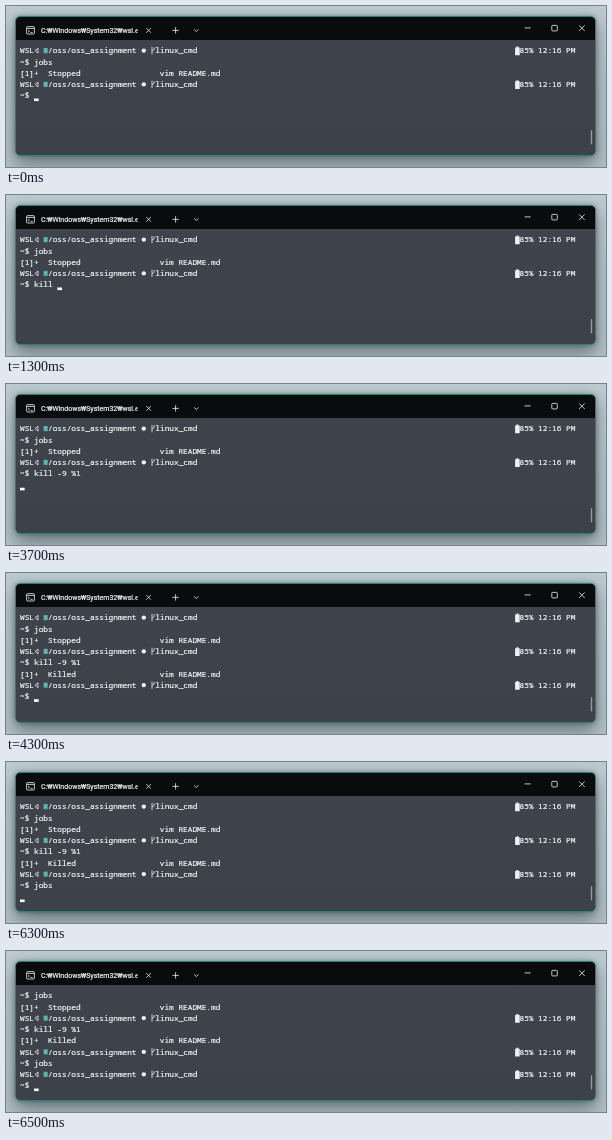
Write an HTML page that moves like this. It is 600x161 px and loops after 7300 ms.

```html
<!DOCTYPE html>
<html lang="en">
<head>
<meta charset="utf-8">
<title>Terminal: kill a stopped job</title>
<style>
  html, body { margin: 0; width: 100%; height: 100%; overflow: hidden; }
  body { position: relative; background: linear-gradient(#bccbd0, #b3c2c7); }
  .window {
    position: absolute; left: 9px; top: 10px; width: 581px; height: 140px;
    box-sizing: border-box; border: 1px solid #2b8079; border-radius: 5px; overflow: hidden;
    background: linear-gradient(#0a0b0d 23.5px, #3e434c 23.5px, #3c414a);
    box-shadow: 0 8px 18px rgba(12, 24, 28, .45), 0 0 4px rgba(12, 24, 28, .35);
  }
  svg { position: absolute; left: 0; top: 0; }
  text { white-space: pre; fill: #f2f4f5; stroke: #f2f4f5; stroke-width: .22; }
  .mono { font: 500 7.78px "Noto Sans Mono", "DejaVu Sans Mono", monospace; }
  .title { font: 7px Roboto, "Open Sans", sans-serif; }
  .line { fill: none; stroke: #eef0f2; stroke-width: .8; }
</style>
</head>
<body>
<div class="window"></div>
<svg width="600" height="161" viewBox="0 0 600 161">
  <defs>
    <clipPath id="view"><rect x="10" y="38" width="579" height="111"/></clipPath>
    <clipPath id="label"><rect x="34" y="16" width="97.5" height="18"/></clipPath>
    <g id="prompt">
      <path class="line" d="M32 3.4 29 5.8 32 8.2Z"/>
      <rect x="37.5" y="3.1" width="4.3" height="5.2" rx=".5" fill="#45aaa8"/>
      <path d="M38.5 4.8h2.2M38.5 6.5h2.2" stroke="#a5dcda" stroke-width=".6"/>
      <circle cx="137.8" cy="5.7" r="2.2" fill="#eef0f2"/>
      <path class="line" d="M146 2v7.4M146 6.2 148.2 4.6V2.6"/>
      <path fill="#eef0f2" d="M510.4 1.6h2v.9h1.3v7.8h-4.6V2.5h1.3z"/>
    </g>
  </defs>
  <g class="line">
    <rect x="20.6" y="20.6" width="7.8" height="7.4" rx="1"/>
    <path d="M20.6 22.4h7.8M22.2 24.1l1.3 1-1.3 1M24.5 26.4h2.2"/>
    <path d="M140.3 22.1l4.6 4.6m0-4.6-4.6 4.6M166.4 24.4h6.4m-3.2-3.2v6.4M188.1 23.4l2.2 2.1 2.2-2.1"/>
    <path d="M518.6 21.9h6M573.1 19.4l5.6 5.6m0-5.6-5.6 5.6"/>
    <rect x="545.8" y="19.4" width="5.5" height="5.5" rx=".7"/>
  </g>
  <text class="title" x="35" y="26.9" clip-path="url(#label)">C:₩Windows₩System32₩wsl.exe</text>
  <g clip-path="url(#view)"><g id="screen"></g></g>
  <rect x="584.8" y="124" width="1.4" height="14.5" rx=".7" fill="#959aa0"/>
</svg>
<script>
const LOOP = 7300, LEFT = 14, TOP = 38.9, CELL = 4.668, LINE = 11.25, ROWS = 9;
const PROMPT = "prompt";
const job = state => "[1]+  " + state.padEnd(24) + "vim README.md";

// [time, row, content]; the cursor follows the latest entry
const steps = [
  [0, 0, PROMPT], [0, 1, "~$ jobs"], [0, 2, job("Stopped")], [0, 3, PROMPT], [0, 4, "~$ "],
  ...typing(4, "~$ ", "kill -9 $", [600, 800, 1000, 1100, 1300, 1400, 1600, 1800, 2600]),
  [2900, 4, "~$ kill -9 "],
  ...typing(4, "~$ kill -9 ", "%1", [3000, 3300]),
  [3700, 5, ""],
  [3900, 5, job("Killed")], [3900, 6, PROMPT], [3900, 7, ""], [4000, 7, "~$ "],
  ...typing(7, "~$ ", "jobs", [5700, 5800, 6000, 6100]),
  [6300, 8, ""],
  [6400, 8, PROMPT], [6400, 9, "~$ "]
];

function typing(row, before, keys, times) {
  return times.map((t, i) => [t, row, before + keys.slice(0, i + 1)]);
}

const screen = document.getElementById("screen");

function add(parent, tag, attrs, content = "") {
  const el = document.createElementNS("http://www.w3.org/2000/svg", tag);
  for (const key in attrs) el.setAttribute(key, attrs[key]);
  el.textContent = content;
  return parent.appendChild(el);
}

function write(parent, col, content) {
  add(parent, "text", { class: "mono", x: LEFT + col * CELL, y: 8.4 }, content);
}

function drawRow(row, content) {
  const g = add(screen, "g", { transform: `translate(0 ${TOP + row * LINE})` });
  if (content !== PROMPT) return write(g, 0, content);
  add(g, "use", { href: "#prompt" });
  write(g, 0, "WSL");
  write(g, 6, "/oss/oss_assignment");
  write(g, 29, "linux_cmd");
  write(g, 107, "85% 12:16 PM");
}

function draw(count) {
  const rows = [];
  for (const [, row, content] of steps.slice(0, count)) rows[row] = content;
  const [, row, content] = steps[count - 1];
  screen.replaceChildren();
  screen.setAttribute("transform", `translate(0 ${-LINE * Math.max(0, rows.length - ROWS)})`);
  rows.forEach((line, i) => drawRow(i, line));
  add(screen, "rect", {
    x: LEFT + content.length * CELL, y: TOP + row * LINE + 8.6,
    width: CELL, height: 2.6, fill: "#fff"
  });
}

let shown = 0;
const start = performance.now();

function tick() {
  const t = (performance.now() - start) % LOOP;
  const count = steps.filter(step => step[0] <= t).length;
  if (count !== shown) draw(shown = count);
  requestAnimationFrame(tick);
}
tick();
</script>
</body>
</html>
```
